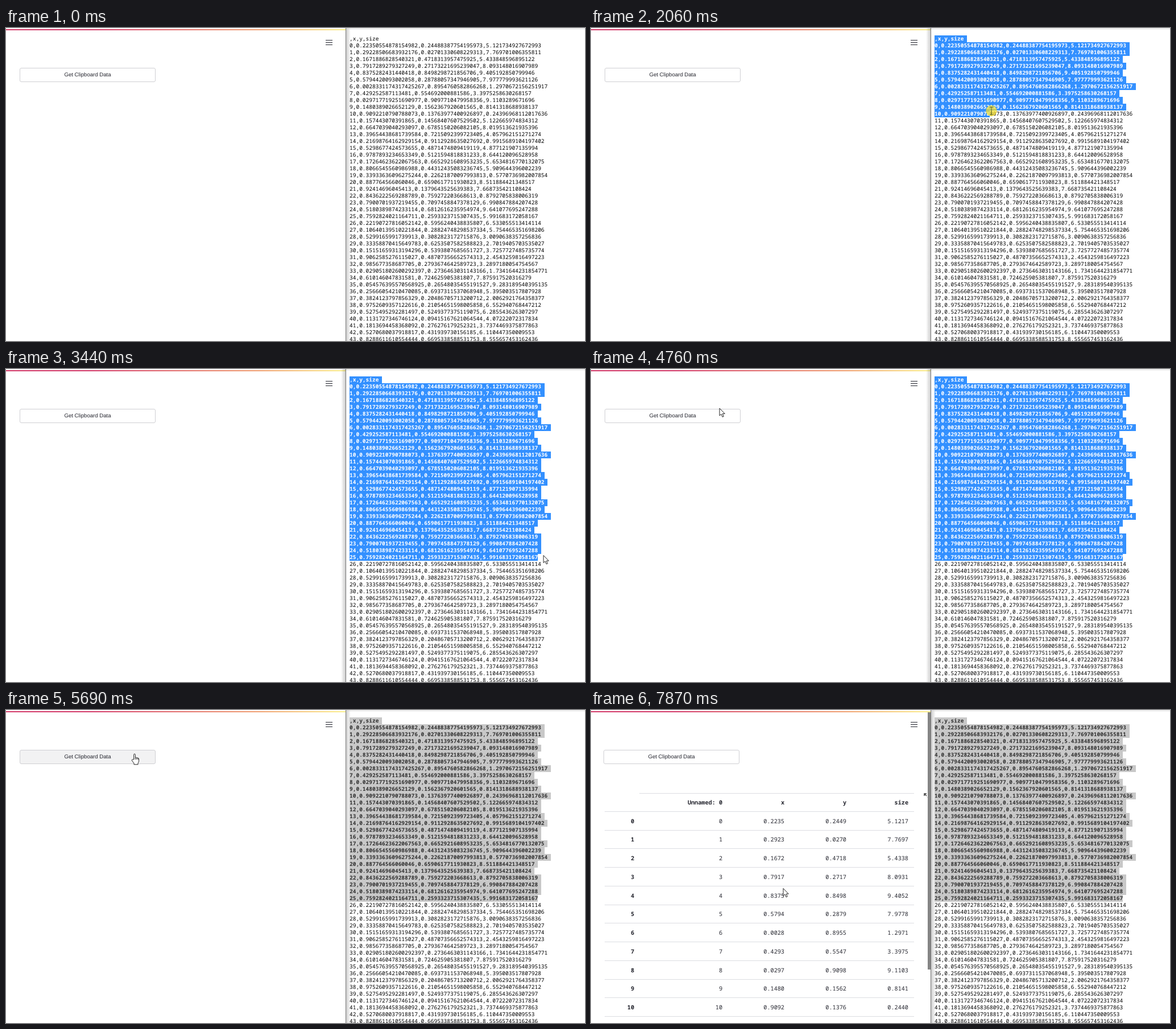
Recreate the animation shown at these times as an HTML page. Size 1018 by 550 pixels, loop 8 s.

```html
<!DOCTYPE html>
<html lang="en">
<head>
<meta charset="utf-8">
<title>Clipboard data</title>
<style>
html, body { margin: 0; width: 100%; height: 100%; overflow: hidden; background: #fff; }
body { position: relative; text-rendering: geometricPrecision; }
body * { box-sizing: border-box; }
.abs, #table span, #table i, #menu i { position: absolute; }
#bar { left: 0; top: 2px; width: 597px; height: 2px; background: linear-gradient(90deg, #d23868 0 25%, #f0a070 75%, #fbf08c); }
#menu i { left: 562px; width: 12px; height: 1.6px; background: #262730; }
#button { left: 24px; top: 70px; width: 239px; height: 25px; border: 1px solid #cfcfd3; border-radius: 3px;
  font: 9.6px/23px "Liberation Sans", Arial, sans-serif; color: #262730; text-align: center; }
#table { left: 0; top: 0; width: 597px; height: 550px; overflow: hidden; color: #262730;
  font: 10.2px/16px "Noto Sans Mono", "DejaVu Sans Mono", monospace; }
#table span { text-align: right; width: 90px; white-space: pre; }
#table .head { font-weight: 600; }
#table i { height: 1px; background: #dcdde2; }
#thumb { left: 592px; top: 4px; width: 5px; height: 452px; background: #858585; }
#edge { left: 597px; top: 0; width: 1px; height: 550px; background: #777; }
#shade { top: 0; width: 8px; height: 550px; }
#csv { left: 604px; top: 12.8px; font: 500 9.53px/12px "Noto Sans Mono", "DejaVu Sans Mono", monospace; color: #000; }
#csv div { height: 12px; white-space: pre; display: flex; }
#csv b { font-weight: 600; background: #3390ff; color: #fff; }
#csv.idle b { background: #c8c8c8; color: #323232; }
#pointer { left: 0; top: 0; overflow: visible; }
</style>
</head>
<body>
<div id="bar" class="abs"></div>
<div id="menu"><i style="top:20.5px"></i><i style="top:24.7px"></i><i style="top:28.9px"></i></div>
<div id="button" class="abs">Get Clipboard Data</div>
<div id="table" class="abs">
  <svg id="expand" class="abs" style="left:585px;top:146px" width="12" height="12" fill="none" stroke="#444" stroke-width="1.5">
    <path d="M1 5V1H5M1 1L5 5M11 7V11H7M11 11L7 7"/>
  </svg>
  <div id="thumb" class="abs"></div>
</div>
<div id="shade" class="abs"></div>
<div id="edge" class="abs"></div>
<div class="abs" style="left:598px;top:1px;width:420px;height:1px;background:#d8d8d8"></div>
<div id="csv" class="abs"></div>
<svg id="pointer" class="abs" width="1" height="1" stroke-linejoin="round">
  <circle id="press" r="9.7" fill="#f7e02c" opacity=".72"/>
  <path id="arrow" d="M0 0V13L3 10.3L5.1 15.3L7.3 14.3L5.2 9.6H9.3Z" fill="#fff" stroke="#222"/>
  <g id="hand" fill="#fff" stroke="#222">
    <path d="M-1.3 10V1.4Q-1.3 .2 0 .2T1.3 1.4V6.6Q2.6 5.6 3.7 7Q5 6.2 6 7.6Q7.4 7.2 7.6 8.8V12.6Q7.5 15 6 16.4V18.8H-1V16.6L-4.6 11.8Q-5.2 10.2-3.6 9.9Z"/>
    <path d="M1.3 6.6V10M3.7 7V10M6 7.6V10.2" fill="none"/>
  </g>
  <path id="beam" d="M-2.5-6.5H2.5M-2.5 6.5H2.5M0-6.5V6.5" fill="none" stroke="#4b5a2a"/>
</svg>
<script>
const $ = id => document.getElementById(id);
const ROWS = 44, LINE = 12, CHAR = 5.718, LEFT = 604, TOP = 13;

// Rows quoted by the table; the others are seeded random points
const data = `0.22350554878154982,0.24488387754195973,5.121734927672993
0.29228506683932176,0.02701330608229313,7.769701006355811
0.1671886828540321,0.4718313957475925,5.433848596895122
0.7917289279327249,0.27173221695239047,8.093148016907989
0.8375282431440418,0.8498298721856706,9.405192850799946
0.5794420093002058,0.28788057347946905,7.977779993621126
0.0028331174317425267,0.8954760582866268,1.2970672156251917
0.429252587113481,0.554692000881586,3.3975258630268157
0.029717719251690977,0.9097710479958356,9.1103289671696
0.1480389026652129,0.1562367920601565,0.8141318688938137
0.9092210790788073,0.13763977400926897,0.24396968112017636`.split("\n");
const tableRows = data.length;
let seed = 20117;
const random = () => (seed = seed * 16807 % 2147483647) / 2147483647;
while (data.length < ROWS) data.push([random(), random(), random() * 10].join());

// CSV rows: selected part, then the rest
const rows = [",x,y,size", ...data.map((d, i) => i + "," + d)].map(text => {
  const row = $("csv").appendChild(document.createElement("div"));
  const part = tag => row.appendChild(document.createElement(tag));
  return { text, on: part("b"), off: part("span") };
});
function select(line, col) {
  rows.forEach(({ text, on, off }, i) => {
    const cut = i < line ? text.length : i === line ? col : 0;
    on.textContent = text.slice(0, cut) + (i < line ? " " : "");
    off.textContent = text.slice(cut);
  });
}

// Result table
function cell(text, col, y, head) {
  const right = col ? 122 + col * 109 : 76;
  const s = $("table").appendChild(document.createElement("span"));
  s.textContent = text;
  s.style.left = right - 90 + "px";
  s.style.top = y - 8 + "px";
  if (head) s.className = "head";
}
function rule(x, y) {
  $("table").appendChild(document.createElement("i")).style.cssText = `left:${x}px;top:${y}px;width:${568 - x}px`;
}
["Unnamed: 0", "x", "y", "size"].forEach((h, i) => cell(h, i + 1, 162, true));
rule(85, 145.5);
rule(24, 178);
for (let r = 0; r < tableRows; r++) {
  const y = 194.5 + r * 32.75;
  cell(r, 0, y, true);
  cell(r, 1, y);
  data[r].split(",").forEach((v, i) => cell((+v).toFixed(4), i + 2, y));
  rule(24, Math.round(y + 16));
}

// Pointer stops: tick, x, y
const path = [
  [0, 604, -8], [10, 602, 14.5], [14, 602, 15], [18, 806, 276], [19, 806, 276],
  [21, 849, 331], [30, 944, 329], [31, 945, 327.5], [41, 945, 327.5], [44, 398, 185],
  [46, 398, 185], [51, 226, 69], [57, 226, 77], [63, 226, 77], [66, 421, 146],
  [88, 421, 146], [91, 338, 313.5]
];
function at(k) {
  const i = path.findIndex(p => p[0] > k);
  if (i < 1) return path.at(i).slice(1);
  const a = path[i - 1], b = path[i];
  const f = (k - a[0]) / (b[0] - a[0]);
  return [1, 2].map(n => a[n] + (b[n] - a[n]) * f);
}
const within = (k, a, b) => k >= a && k < b;
const show = (id, on) => $(id).style.display = on ? "" : "none";

function draw(k) {
  const [x, y] = at(k);
  const rightActive = within(k, 11, 55), done = k >= 75;
  const dragging = within(k, 11, 34);
  const overButton = within(x, 24, 263) && within(y, 70, 95);
  const overText = dragging && within(x, LEFT, 930);

  $("pointer").style.transform = `translate(${x}px,${y}px)`;
  show("pointer", k >= 0);
  show("press", dragging || k === 55 || k === 60);
  show("hand", overButton);
  show("beam", overText);
  show("arrow", !overButton && !overText);

  if (k < 15) select(0, 0);
  else if (k < 30) select(Math.floor((y - TOP) / LINE), Math.round((x - LEFT) / CHAR));
  else select(26, 99);
  $("csv").classList.toggle("idle", !rightActive);

  $("shade").style.left = rightActive ? "589px" : "598px";
  $("shade").style.background = `linear-gradient(${rightActive ? 90 : 270}deg, #0000, #0003)`;
  $("button").style.background = overButton && k >= 60 ? "#f2f2f3" : "#fff";
  $("button").style.left = done ? "22px" : "24px";
  show("table", done);
  $("expand").style.opacity = Math.min(1, (k - 74) / 9);
}

// The screen refreshes in even ticks; the pointer enters at tick 0
let last;
function frame(now) {
  const k = Math.max(-1, Math.floor((now % 8000 - 790) / 77.5));
  if (k !== last) draw(last = k);
  requestAnimationFrame(frame);
}
frame(0);
</script>
</body>
</html>
```
